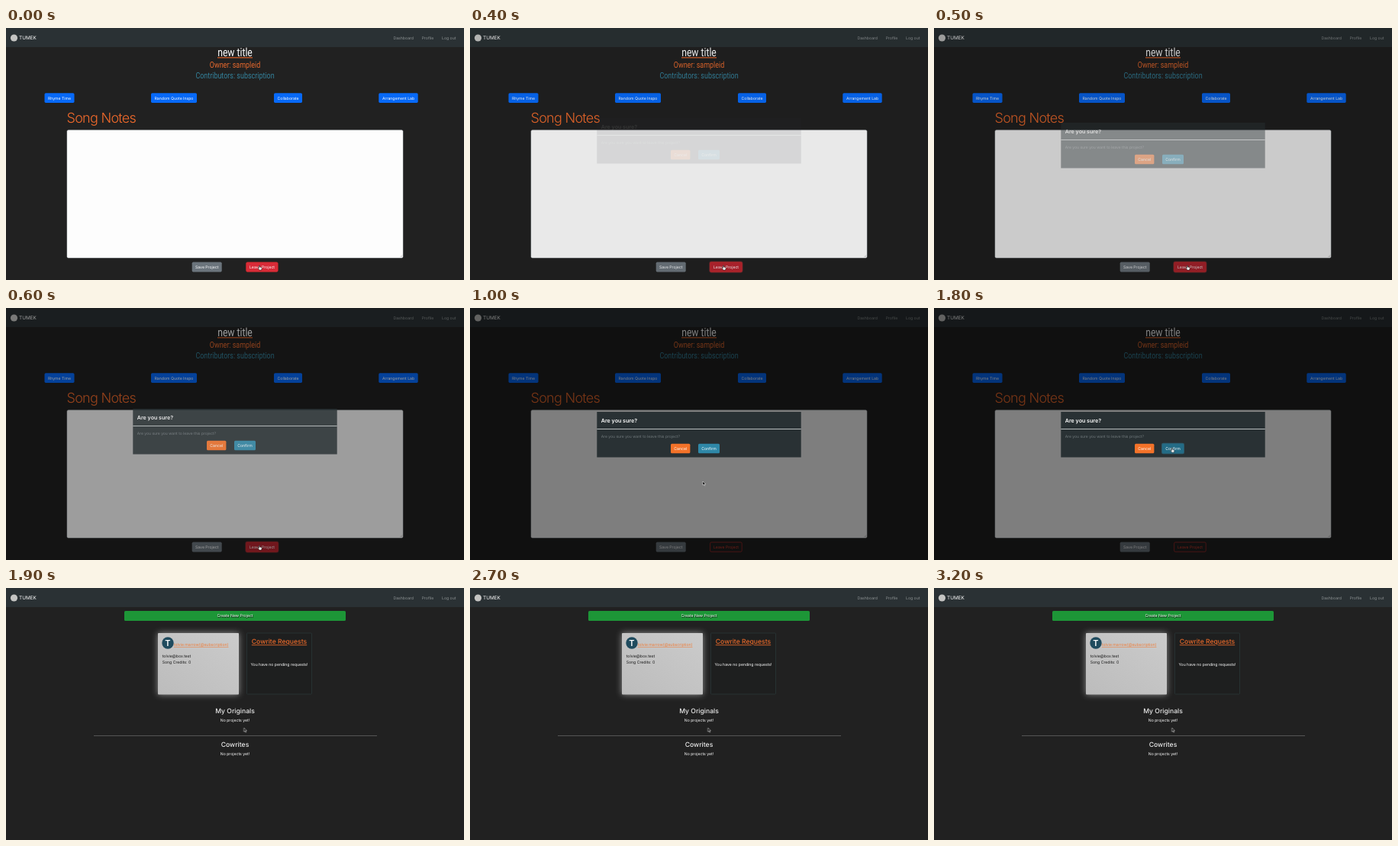
These frames come from a looping animation (600x330 px, 3.3 s). An HTML page:

```html
<!DOCTYPE html>
<html lang="en">
<head>
<meta charset="utf-8">
<title>Leave project flow</title>
<style>
  html, body { margin: 0; width: 100%; height: 100%; overflow: hidden; background: #212121; }
  svg { display: block; width: 600px; height: 330px; }
  text { font: 5.15px Inter, Roboto, sans-serif; fill: #fff; text-rendering: geometricPrecision; }
  .mid { text-anchor: middle; }
  .nav text { fill: #8d9394; }
  .nav .brand { font-size: 6.4px; fill: #fff; }
  .head text { font: 11.2px Roboto, sans-serif; text-anchor: middle; }
  .head .title { font-size: 15.2px; }
  .notes { font-size: 18px; font-weight: 300; letter-spacing: -.04em; fill: #f26a2b; }
  .blue rect { fill: #0769f8; }
  .modal .ask { font-size: 7.1px; font-weight: 600; }
  .modal .hint { font-size: 5px; fill: #717a7d; }
  .big { font-size: 8.6px; font-weight: 500; fill: #ececec; }
  .dark { fill: #161616; }
  .create { text-shadow: .5px .5px .5px #000; }
  .profile { filter: drop-shadow(0 0 4px rgba(255, 255, 255, .5)); }

  /* Everything runs on one 3.3 s clock in 100 ms holds. */
  .a { animation: 3300ms step-end infinite; }
  .editor    { animation-name: editor; }
  .dash      { animation-name: dash; }
  .backdrop  { animation-name: backdrop; }
  .modal     { animation-name: modal; }
  .leaveFill { animation-name: leaveFill; }
  .leaveLine { animation-name: leaveLine; }
  .leaveRing { animation-name: leaveRing; }
  .confirm   { animation-name: confirm; }
  .okRing    { animation-name: okRing; }
  .cursor    { animation-name: cursor; }
  .hand      { animation-name: hand; }
  .arrow     { animation-name: arrow; }

  @keyframes editor { 0% { opacity: 1 } 57.57%, 100% { opacity: 0 } }
  @keyframes dash { 0% { opacity: 0 } 57.57%, 100% { opacity: 1 } }
  @keyframes backdrop {
    0% { opacity: 0 } 12.12% { opacity: .08 } 15.15% { opacity: .2 }
    18.18% { opacity: .38 } 21.21%, 100% { opacity: .5 }
  }
  @keyframes modal {
    0% { opacity: 0; transform: translateY(-21px) }
    12.12% { opacity: .1; transform: translateY(-18px) }
    15.15% { opacity: .43; transform: translateY(-12px) }
    18.18% { opacity: .82; transform: translateY(-4px) }
    21.21%, 100% { opacity: 1; transform: none }
  }
  @keyframes leaveFill { 0% { fill: #d92b38 } 9.09% { fill: #b5242f } 24.24%, 100% { fill: #212121 } }
  @keyframes leaveLine { 0% { fill: #fff } 24.24%, 100% { fill: #df3a2c } }
  @keyframes leaveRing { 0% { opacity: 0 } 9.09% { opacity: .45 } 24.24%, 100% { opacity: 0 } }
  @keyframes confirm { 0% { fill: #2f88a8 } 39.39%, 100% { fill: #246c86 } }
  @keyframes okRing { 0% { opacity: 0 } 51.51%, 100% { opacity: .5 } }
  @keyframes cursor {
    0% { transform: translate(332px, 311px) }
    27.27% { transform: translate(318px, 270px) }
    30.3% { transform: translate(305px, 227px) }
    33.33% { transform: translate(304px, 214px) }
    36.36% { transform: translate(307px, 198px) }
    39.39% { transform: translate(311px, 187px) }
    42.42%, 100% { transform: translate(311.7px, 183.2px) }
  }
  @keyframes hand { 0% { opacity: 1 } 27.27% { opacity: 0 } 39.39% { opacity: 1 } 57.57%, 100% { opacity: 0 } }
  @keyframes arrow { 0% { opacity: 0 } 27.27% { opacity: 1 } 39.39% { opacity: 0 } 57.57%, 100% { opacity: 1 } }
</style>
</head>
<body>
<svg viewBox="0 0 600 330">
  <defs>
    <linearGradient id="silver" x1="0" y1="1" x2="1" y2="0">
      <stop offset="0" stop-color="#bcbcbc"/><stop offset="1" stop-color="#cbcbcb"/>
    </linearGradient>
  </defs>
  <rect width="600" height="330" fill="#212121"/>

  <g class="nav">
    <rect width="600" height="25" fill="#2a3134"/>
    <circle cx="10.5" cy="13" r="4.6" fill="#c4c4c2"/>
    <text class="brand" x="17" y="15.3">TUMEK</text>
    <text x="507.5" y="14.8">Dashboard</text>
    <text x="544.7" y="14.8">Profile</text>
    <text x="571" y="14.8">Log out</text>
  </g>

  <g class="a editor">
    <!-- condensed heading face -->
    <g class="head" transform="translate(300 0) scale(.8 1)">
      <text class="title" y="37.3">new title</text>
      <text y="52.3" style="fill:#e8692d">Owner: sampleid</text>
      <text y="66.4" style="fill:#34829c">Contributors: subscription</text>
    </g>
    <rect x="277" y="38.3" width="46" height="1.1" fill="#f26a2b"/>

    <g class="blue mid">
      <rect x="50.5" y="85.3" width="39" height="12.6" rx="1.6"/>
      <text x="70" y="93.5">Rhyme Time</text>
      <rect x="190" y="85.3" width="60" height="12.6" rx="1.6"/>
      <text x="220" y="93.5">Random Quote Inspo</text>
      <rect x="351" y="85.3" width="37" height="12.6" rx="1.6"/>
      <text x="369.5" y="93.5">Collaborate</text>
      <rect x="488.3" y="85.3" width="51.4" height="12.6" rx="1.6"/>
      <text x="514" y="93.5">Arrangement Lab</text>
    </g>

    <text class="notes" x="79.5" y="124.3">Song Notes</text>
    <rect x="80" y="133.7" width="440" height="167.3" rx="1.7" fill="#fdfdfd" stroke="#ced4da" stroke-width=".5"/>
    <path d="M516.5 300l2.7-2.7M518.2 300l1-1" stroke="#777" stroke-width=".4"/>

    <rect x="243.7" y="306.6" width="39" height="12.8" rx="1.6" fill="#6b747c"/>
    <text class="mid" x="263.2" y="314.9">Save Project</text>
    <rect class="a leaveRing" x="313.4" y="305.6" width="44" height="14.8" rx="2.4" fill="#dc3545"/>
    <rect class="a leaveFill" x="314.6" y="306.8" width="41.6" height="12.4" rx="1.6" stroke="#d92f2c" stroke-width=".6"/>
    <text class="a leaveLine mid" x="335.5" y="314.9">Leave Project</text>

    <rect class="a backdrop" width="600" height="330" fill="#000"/>

    <g class="a modal">
      <rect x="166.3" y="136" width="267.4" height="59.5" fill="#293134"/>
      <rect x="166.3" y="158.2" width="267.4" height=".8" fill="#dde0e1"/>
      <text class="ask" x="171.8" y="150">Are you sure?</text>
      <text class="hint" x="171.8" y="170">Are you sure you want to leave this project?</text>
      <rect x="263" y="177.8" width="25.4" height="12.5" rx="1.5" fill="#f37229"/>
      <text class="mid" x="275.7" y="186">Cancel</text>
      <rect class="a okRing" x="298" y="176.8" width="30" height="14.5" rx="2.3" fill="#2f88a8"/>
      <rect class="a confirm" x="299" y="177.8" width="28" height="12.5" rx="1.5"/>
      <text class="mid" x="313" y="186">Confirm</text>
    </g>
  </g>

  <g class="a dash">
    <rect x="155" y="30" width="290" height="13" rx="1.6" fill="#1d9637"/>
    <text class="mid create" x="300" y="38.4">Create New Project</text>

    <rect class="profile" x="199" y="59" width="106" height="80.5" rx="1" fill="url(#silver)"/>
    <circle cx="212" cy="72" r="7.7" fill="#1f4b5e"/>
    <text class="mid" x="212" y="75.9" style="font-size:11px;font-weight:600">T</text>
    <text x="219.8" y="76" style="fill:#f27a33;text-decoration:underline">tolvie marrow(@subscription)</text>
    <text class="dark" x="204.7" y="90.8" style="fill:#161616">tolvie@box.test</text>
    <text class="dark" x="204.7" y="98.8" style="fill:#161616">Song Credits: 0</text>

    <rect x="315.5" y="59" width="85" height="80" rx="1" fill="#1e1f1f" stroke="#2b3a3b" stroke-width=".7"/>
    <text class="big mid" x="358" y="73.3" style="fill:#e9692a;text-decoration:underline">Cowrite Requests</text>
    <text class="mid" x="358" y="101.8">You have no pending requests!</text>

    <text class="big mid" x="300" y="164.3">My Originals</text>
    <text class="mid" x="300" y="175.2">No projects yet!</text>
    <rect x="115" y="193" width="371" height=".8" fill="#636363"/>
    <text class="big mid" x="300" y="208">Cowrites</text>
    <text class="mid" x="300" y="218.8">No projects yet!</text>
  </g>

  <g class="a cursor" stroke-linejoin="round">
    <path class="a arrow" d="M0 0V5l1.2-1.1.8 1.9.9-.4-.8-1.8h1.6z" fill="#000" stroke="#fff" stroke-width=".5"/>
    <path class="a hand" d="M-.5 0q.6-.5 1 0v2l2.2.6q.6.3.4 1.2l-.5 2.2h-2.6l-2-2.6q.2-.8 1.5.1z" fill="#fff" stroke="#000" stroke-width=".5"/>
  </g>
</svg>
</body>
</html>
```
